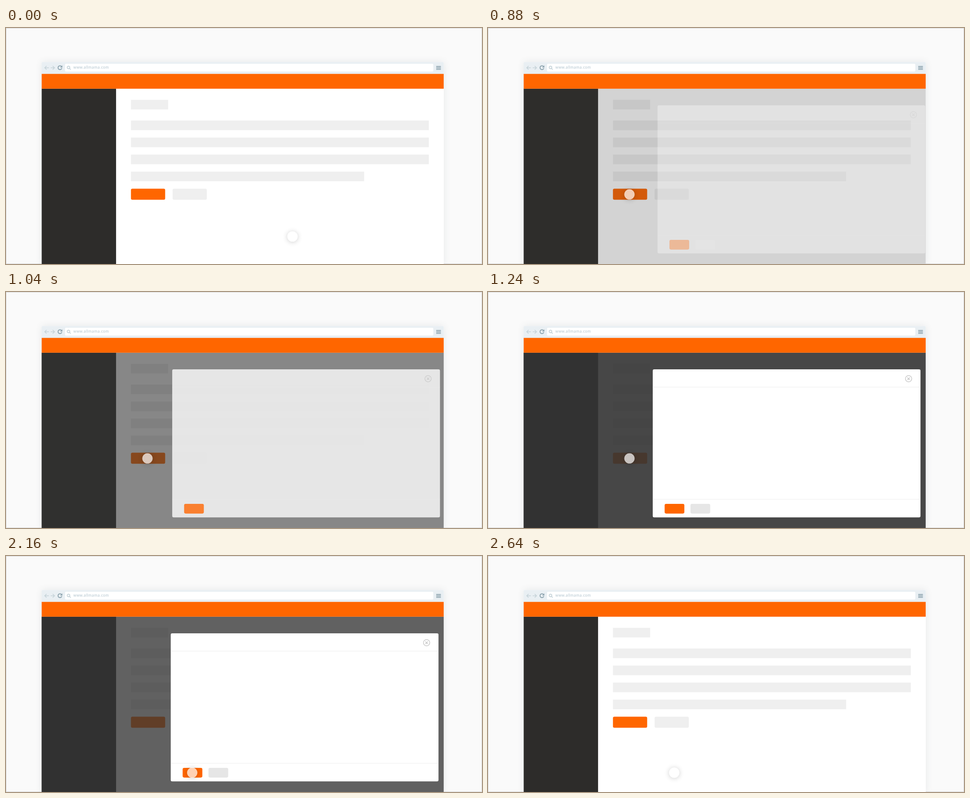
These frames come from a looping animation (1060x528 px, 3.32 s). An HTML page:

```html
<!DOCTYPE html>
<html lang="en">
<head>
<meta charset="utf-8">
<title>Dialog flow</title>
<style>
  html, body { margin: 0; width: 100%; height: 100%; overflow: hidden; background: #fafafa; }
  svg { position: absolute; left: 0; top: 0; }
  #frame { position: absolute; inset: 0; border: 1px solid #d5d5d5; }
  #window { position: absolute; left: 79.5px; top: 76.2px; right: 85.3px; bottom: 0;
    border-radius: 3px 3px 0 0; box-shadow: 0 0 16px rgba(60, 80, 90, .1); }
  #cursor { position: absolute; left: 0; top: 0; width: 23px; height: 23px;
    border-radius: 50%; background: rgba(255, 255, 255, .7);
    box-shadow: 0 1px 12px rgba(0, 0, 0, .2); }
  text { font: 600 8px "Open Sans", "Noto Sans", sans-serif; letter-spacing: .36px; }
</style>
</head>
<body>
<div id="frame"></div>
<div id="window"></div>
<svg width="1060" height="528" viewBox="0 0 1060 528" fill="none">
  <!-- the layout grid is 1280 units wide -->
  <g transform="scale(.828125)">
    <path fill="#e9eff3" d="M96 125V95q0-3 3-3H1174q3 0 3 3v30z"/>
    <rect x="96" y="164" width="1081" height="474" fill="#fff"/>
    <rect x="96" y="164" width="200" height="474" fill="#2d2c2a"/>
    <g fill="#efefef">
      <rect x="336" y="194" width="100" height="26"/>
      <rect x="336" y="250" width="801" height="26"/>
      <rect x="336" y="296" width="801" height="26"/>
      <rect x="336" y="342" width="801" height="26"/>
      <rect x="336" y="388" width="627" height="26"/>
      <rect x="448" y="434" width="92" height="30" rx="4"/>
    </g>
    <rect x="336" y="434" width="92" height="30" rx="4" fill="#f60"/>
    <rect id="shade" x="96" y="164" width="1081" height="474" fill="#333"/>
    <rect x="96" y="124" width="1081" height="40" fill="#f60"/>
  </g>

  <!-- browser bar -->
  <rect x="131.5" y="80" width="820" height="17.5" rx="2" fill="#fff"/>
  <g stroke="#c6d3d9" stroke-width="1.7">
    <path d="M95.500 89H87M90.300 85L86.300 89l4 4M99.500 89h8.500M104 85l4 4-4 4"/>
    <circle cx="139.200" cy="88.200" r="2.900"/>
    <path d="M141.300 90.300l2.900 2.900"/>
  </g>
  <path stroke="#8fa5b0" stroke-width="2" d="M123.600 86.200A4.300 4.300 0 1 0 124.300 90"/>
  <path fill="#8fa5b0" d="M125.500 83.500v5h-5z"/>
  <path stroke="#8fa5b0" stroke-width="2" d="M958 86h10.500M958 89.200h10.500M958 92.400h10.500"/>
  <text x="150" y="91.300" fill="#bfced6">www.allmama.com</text>

  <g id="dialog">
    <g transform="scale(.828125)">
      <rect x="443" y="209" width="720" height="400" rx="4" fill="#fff"/>
      <path stroke="#e8e8e8" d="M443 257H1163M443 560H1163"/>
      <path stroke="#c8c8c8" stroke-width="1.800"
        d="M1122.500 234.300a8.500 8.500 0 1 0 17 0a8.500 8.500 0 1 0 -17 0M1127.600 230.900l6.800 6.800m0-6.800l-6.800 6.800"/>
      <rect x="475" y="572.500" width="53" height="26" rx="4" fill="#f60"/>
      <rect x="544.500" y="572.500" width="53" height="26" rx="4" fill="#e6e6e6"/>
    </g>
  </g>
</svg>
<div id="cursor"></div>
<script>
  const LOOP = 3320, STEP = 40, RADIUS = 11.5;
  const [shade, dialog, cursor] = ['shade', 'dialog', 'cursor'].map(id => document.getElementById(id));
  const dialogParts = dialog.querySelectorAll('rect, path');

  const progress = (t, from, to) => Math.min(1, Math.max(0, (t - from) / (to - from)));
  const ease = u => (1 - Math.cos(Math.PI * u)) / 2;
  const press = (t, from, to) => 0.15 * Math.sin(Math.PI * progress(t, from, to));
  const bezier = (a, b, c, u) => (1 - u) ** 2 * a + 2 * u * (1 - u) * b + u * u * c;

  function cursorAt(t) {
    const toPage = ease(progress(t, 240, 560));
    const toDialog = ease(progress(t, 1720, 1960));
    return [
      bezier(638, 490, 315, toPage) + 99.7 * toDialog,
      bezier(466.5, 500, 372.3, toPage) + 112.5 * toDialog
    ];
  }

  function draw(t) {
    const enter = progress(t, 800, 1240);
    const shown = 1 - (1 - enter) ** 2;
    const leave = progress(t, 2160, 2480);
    const shadeIn = 1 - (1 - enter) ** 1.35;

    shade.setAttribute('opacity', 0.9 * shadeIn * (1 - progress(t, 2080, 2640)));
    // every part fades by itself, so the panel shows through its buttons
    for (const part of dialogParts) part.setAttribute('opacity', shown * (1 - leave));
    dialog.setAttribute('transform', `translate(${16 * (1 - shown) + 738 * leave})`);

    const [x, y] = cursorAt(t);
    const scale = 1 - press(t, 560, 800) - press(t, 1960, 2160);
    cursor.style.transform = `translate(${x - RADIUS}px, ${y - RADIUS}px) scale(${scale})`;
  }

  function tick() {
    const t = performance.now() % LOOP;
    draw(Math.floor(t / STEP) * STEP);
    requestAnimationFrame(tick);
  }
  tick();
</script>
</body>
</html>
```
